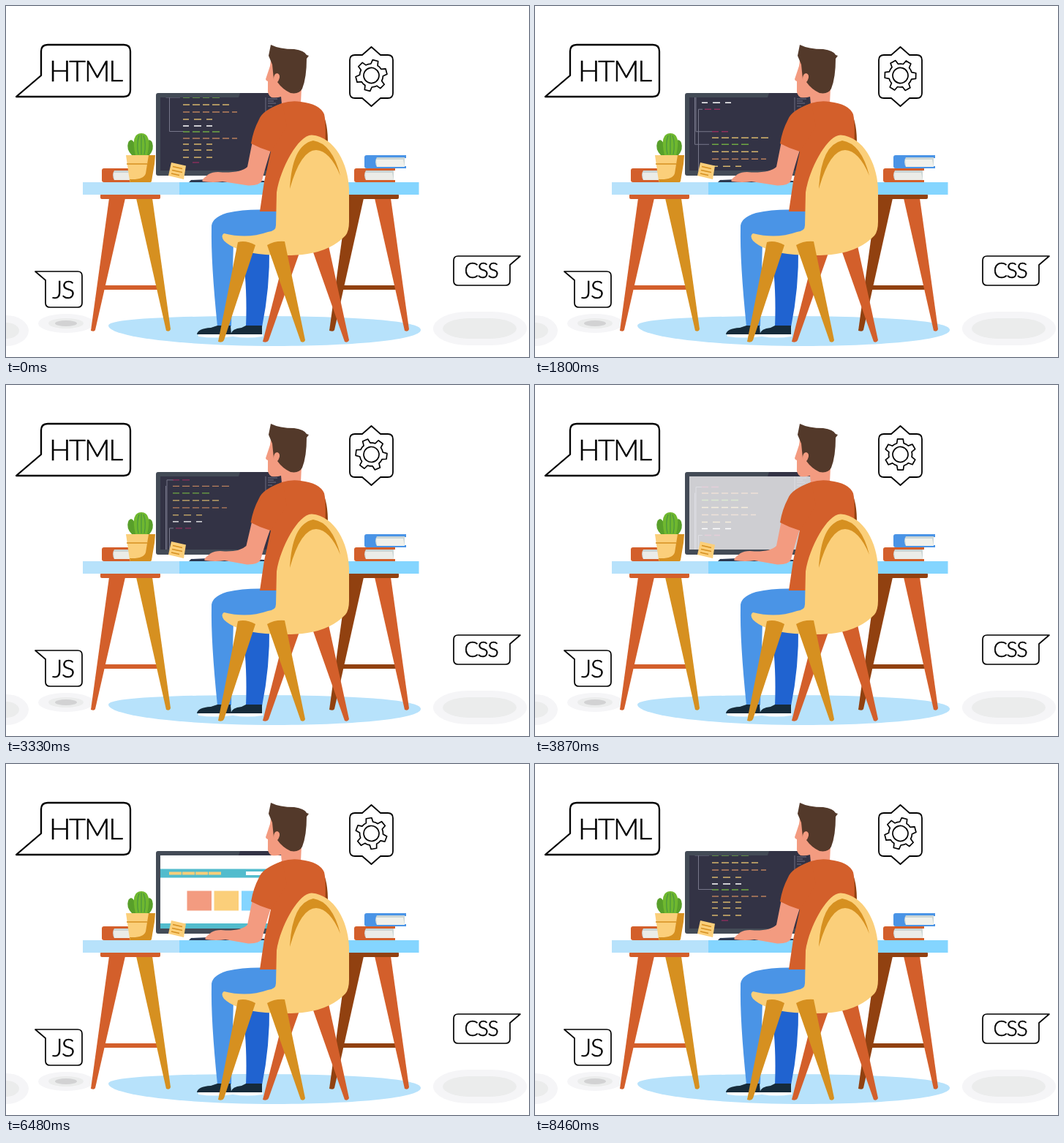
These frames come from a looping animation (715 by 480 pixels, 8.53 s). An HTML page:

```html
<!DOCTYPE html>
<html lang="en">
<head>
<meta charset="utf-8">
<title>Developer at work</title>
<style>
  html, body { margin: 0; width: 100%; height: 100%; overflow: hidden; background: #fff; }
  svg { display: block; width: 715px; height: 480px; }
  text { font-family: Lato, "Open Sans", sans-serif; font-weight: 300; text-anchor: middle; stroke: #000; stroke-width: .6; }
  .line { fill: none; stroke: #000; stroke-linejoin: round; }
  .or { fill: #d35f2b; } .gold { fill: #d69020; } .sand { fill: #fbcf7a; }
  .brown { fill: #914110; } .skin { fill: #f39b80; } .teal { fill: #52bccd; }
  .sky { fill: #84d5ff; } .pale { fill: #b7e2fb; } .navy { fill: #162b3a; }
</style>
</head>
<body>
<svg viewBox="0 0 715 480">
  <defs>
    <clipPath id="screen"><rect x="211" y="125" width="174" height="100"/></clipPath>
  </defs>

  <!-- floor -->
  <g fill="#f5f5f7">
    <ellipse cx="0" cy="444" rx="31" ry="21"/>
    <ellipse cx="82" cy="434" rx="38" ry="13"/>
    <rect x="584" y="418" width="128" height="46" rx="48" ry="23"/>
  </g>
  <g fill="#ebecec">
    <ellipse cx="0" cy="444" rx="18" ry="11"/>
    <ellipse cx="82" cy="434" rx="24" ry="7"/>
    <rect x="597" y="427" width="101" height="28" rx="38" ry="14"/>
  </g>
  <ellipse cx="82" cy="434" rx="15" ry="4" fill="#d2d2d3"/>
  <path class="pale" d="M140 437C140 428 225 424 340 424C470 424 567 430 567 443C567 456 480 465 370 465C240 465 140 452 140 437Z"/>

  <!-- speech bubbles -->
  <path class="line" stroke-width="2.3" d="M57 53H161Q170 53 170 62V115Q170 124 161 124H14L48 95V62Q48 53 57 53Z"/>
  <text x="108.5" y="102.5" font-size="39" letter-spacing="-2">HTML</text>
  <path class="line" stroke-width="1.7" d="M40 363H98Q104 363 104 369V406Q104 412 98 412H60Q54 412 54 406V375Z"/>
  <text x="78" y="400" font-size="34" letter-spacing="-1.5">JS</text>
  <path class="line" stroke-width="1.7" d="M618 342H703L689 354V376Q689 382 683 382H618Q612 382 612 376V348Q612 342 618 342Z"/>
  <text x="649.5" y="371.5" font-size="28.500" letter-spacing="-1.2">CSS</text>
  <path class="line" stroke-width="1.8" d="M477 67H487L499.500 56L512 67H522Q529 67 529 74V119Q529 126 522 126H512L499.500 137L487 126H477Q470 126 470 119V74Q470 67 477 67Z"/>
  <g id="gear" class="line" stroke-width="1.7">
    <path id="teeth"/>
    <circle r="10.5"/>
  </g>

  <!-- desk legs -->
  <rect class="brown" x="455" y="382" width="78" height="6"/>
  <path class="brown" d="M467 263H489L449 443Q448 446 442 444Z"/>
  <path class="or" d="M504 263H526L551 442Q550 446 545 444Z"/>
  <rect class="brown" x="440" y="257" width="97" height="7" rx="2"/>
  <rect class="or" x="132" y="382" width="78" height="6"/>
  <path class="or" d="M141 263H163L122 443Q121 446 116 444Z"/>
  <path class="gold" d="M178 263H200L225 442Q224 446 219 444Z"/>
  <rect class="or" x="129" y="257" width="82" height="7" rx="2"/>

  <!-- books -->
  <path class="or" d="M134 222H170V241H134Q131 241 131 238V225Q131 222 134 222Z"/>
  <path d="M148 225H170V238H148Q144 231 148 225Z" fill="#cbd5d5"/>
  <path d="M147 228H170V238H148Z" fill="#ebece8"/>
  <path class="or" d="M479 222H532V225H530V238H532V241H479Q476 241 476 238V225Q476 222 479 222Z"/>
  <path d="M492 225H530V238H492Q488 231 492 225Z" fill="#cbd5d5"/>
  <path d="M491 228H528L530 238H492Z" fill="#ebece8"/>
  <path d="M493 204H547V208H545V219H547V222H493Q490 222 490 219V207Q490 204 493 204Z" fill="#4a94e6"/>
  <path d="M507 207H545V220H507Q503 213 507 207Z" fill="#cbd5d5"/>
  <path d="M506 210H543L545 220H507Z" fill="#f0f1ec"/>

  <!-- monitor -->
  <rect x="205" y="119" width="180" height="113" rx="3" fill="#434b56"/>
  <path d="M320 119H385V125H318Z" fill="#333345"/>
  <g clip-path="url(#screen)">
    <rect x="211" y="125" width="174" height="100" fill="#333345"/>
    <g id="code" fill="none">
      <path d="M229 11H220V107.500H242M218.500 19V125H238M229 77H223.500V171.500H243" stroke="#77778a" stroke-width="1"/>
    </g>
    <path d="M355 124V146M358 127H371M358 130H366M358 133H369M358 137H364" stroke="#74748a" stroke-width=".9" fill="none"/>
    <rect id="blank" x="211" y="125" width="174" height="100" fill="#fff"/>
    <rect id="bar" class="sky" x="254" y="177" width="0" height="5"/>
    <g id="page">
      <g id="nav">
        <rect class="teal" x="211" y="143.500" width="174" height="12"/>
        <path d="M223 149.500H294" stroke="#fbcf7a" stroke-width="4" stroke-dasharray="17 1"/>
        <rect x="328" y="147" width="34" height="5" fill="#fff"/>
      </g>
      <g id="cards">
        <rect class="skin" x="247.500" y="173.500" width="33.500" height="27"/>
        <rect class="sand" x="284.500" y="173.500" width="33.500" height="27"/>
        <rect class="sky" x="322" y="173.500" width="33.500" height="27"/>
      </g>
      <g id="hero">
        <rect class="teal" x="211" y="218" width="174" height="80"/>
        <rect class="sand" x="228" y="227.500" width="48" height="40"/>
        <path class="sand" d="M217 244V250L212.500 247Z"/>
        <path d="M288 242H340M288 245.300H340M288 248.600H340M288 252H340" stroke="#fff" stroke-width="1.4"/>
      </g>
    </g>
  </g>

  <!-- desk top and what stands on it -->
  <rect class="sky" x="105" y="241" width="459.500" height="17"/>
  <rect class="pale" x="105" y="241" width="132" height="17"/>
  <path d="M250 241L253 238L300 236L353 239V241Z" fill="#2b3850"/>
  <g fill="#589f2a">
    <path d="M172 204Q164 196 167 187Q171 179 176 188L182 204Z"/>
    <path d="M196 204Q203 196 200 187Q196 179 191 188L186 204Z"/>
    <path d="M177 204Q170 174 185 174Q200 174 193 204Z" fill="#6fb82f"/>
  </g>
  <path d="M181 203Q178 188 182 177M189 203Q192 188 188 177M185 203V176" fill="none" stroke="#4a9440" stroke-width="1.200"/>
  <path class="sand" d="M164 204H203L199 239Q199 241 196 241H172Q169 241 169 239Z"/>
  <path class="gold" d="M195 204H204L203 216L199 239Q199 241 196 241H170L169 237Q188 238 191 229Z"/>
  <path d="M165 216H193" stroke="#d69020" stroke-width="1.500"/>
  <path class="sand" d="M226 214L246 218.500L243 237L222 232Z"/>
  <path d="M228 219.500L241 222.500M227 224.500L241 227.500M226 229L237 231.500" stroke="#d69020" stroke-width="1.500"/>

  <!-- cup -->
  <g id="cup">
    <path class="skin" d="M331 151Q337 148 343 155L350 172L352 186L334 180L338 168L331 160Z"/>
    <path d="M321 124Q319 123 320 126L311 152Q311 156 316 157L329 161Q332 161 333 157L343 132Q344 130 341 129Z" fill="#f7f7f7"/>
    <path d="M339 129L343 130L332 158L329 160Z" fill="#dcdde0"/>
    <path class="skin" d="M333 151Q338 149 341 155L343 166L337 166Z"/>
  </g>

  <!-- person -->
  <path d="M322 330H360Q361 385 350 439H328Q330 385 324 345Z" fill="#2063d0"/>
  <path d="M281 303Q280 290 302 283Q335 276 372 280V318L311 322L308 438H289Q280 350 281 303Z" fill="#4a94e6"/>
  <path d="M263 449H351V452Q330 455 310 452Q285 455 263 452Z" fill="#fff"/>
  <path class="navy" d="M261 449Q262 441 280 440L289 437H307L308 449Z"/>
  <path class="navy" d="M307 449Q309 441 322 440L328 437H350V449Z"/>
  <path class="brown" d="M433 148Q440 160 440 188L430 190Z"/>
  <path class="skin" d="M362 74L361 82L355 100Q355 102 358 103L358 112Q357 122 363 125Q370 126 376 124L377 134Q390 137 403 133L404 112L400 76Z"/>
  <path class="or" d="M377 133Q390 129 403 131Q429 134 435 148Q438 160 436 200L420 281H347L353 240L362 199L346 160Q351 143 377 133Z"/>
  <path d="M362 53Q374 59 394 59Q408 61 411 67L414 68L411 72Q411 98 405 113Q401 121 389 119Q378 114 371 104L366 100L364 80L359 68Z" fill="#53392a"/>
  <path class="skin" d="M366 100Q366 92 371 92Q376 94 373 101Q371 106 367 104Z"/>
  <g id="lean">
    <path id="arm" class="skin"/>
    <path class="or" d="M378 133Q351 142 346 155Q338 170 335 188Q348 195 362 199L384 165Z"/>
  </g>

  <!-- chair -->
  <path class="or" d="M382 338H401L359 457Q357 461 351 459Z"/>
  <path class="or" d="M419 334L441 328L469 457Q467 461 463 459Z"/>
  <path class="sand" d="M418 176.500C400 176 375 222 370 255L369 300Q369 308 358 309Q330 319 298 311Q293 314 298 321Q311 334 345 339Q385 343 412 339Q445 334 464 314Q469 308 469 295V250C468 217 450 179 418 176.500Z"/>
  <path class="gold" d="M388 250Q391 190 420 184Q446 188 457 232Q443 198 424 197Q403 197 388 250Z"/>
  <path class="gold" d="M317 323Q328 320 341 327L298 457Q296 461 290 459Z"/>
  <path class="gold" d="M357 327Q367 321 381 322L409 457Q408 461 403 459Z"/>
</svg>

<script>
const LOOP = 8530, STEP = 30, LAST = 8460;
const $ = id => document.getElementById(id);
const ramp = (t, a, b) => Math.min(1, Math.max(0, (t - a) / (b - a)));
const ease = (t, a, b) => { const p = ramp(t, a, b); return p * p * (3 - 2 * p); };
const set = (id, name, value) => $(id).setAttribute(name, value);
const move = (id, x, y) => set(id, "transform", `translate(${x} ${y})`);

// Code rows: y, left, right, colour
const YELLOW = "#d6b56c", RUST = "#b9805c", GREEN = "#6fa843", PLUM = "#8f2f5c", WHITE = "#fff";
const rows = [
  [11, 228, 251, PLUM], [19.5, 228, 305, RUST], [29, 228, 280, GREEN],
  [39, 228, 291, YELLOW], [49, 228, 302, RUST], [59, 228, 268, YELLOW],
  [68, 228, 268, WHITE], [77, 232, 253, PLUM], [107.5, 242, 264, PLUM],
  [116, 242, 319, YELLOW], [125, 242, 295, GREEN], [135, 242, 305, YELLOW],
  [145, 242, 316, RUST], [155, 242, 282, YELLOW], [164, 242, 282, WHITE],
  [172, 242, 294, GREEN], [181, 242, 316, RUST], [189, 242, 282, YELLOW],
  [197, 242, 282, YELLOW], [207, 242, 282, YELLOW], [214, 255, 265, PLUM]
];

function addRow([y, x1, x2, stroke]) {
  const line = document.createElementNS("http://www.w3.org/2000/svg", "line");
  const dash = x2 - x1 === 40 ? "8 7 10 7" : "9 4 10 4";
  const attrs = { x1, x2, y1: y, y2: y, stroke, "stroke-width": 1.4, "stroke-dasharray": dash };
  for (const name in attrs) line.setAttribute(name, attrs[name]);
  $("code").append(line);
}

function gearPath(teeth, root, tip) {
  const pitch = 2 * Math.PI / teeth, points = [];
  for (let i = 0; i < teeth; i++) {
    for (const [at, r] of [[-0.29, root], [-0.17, tip], [0.17, tip], [0.29, root], [0.5, root]]) {
      const a = (i + at) * pitch;
      points.push(`${(r * Math.cos(a)).toFixed(2)} ${(r * Math.sin(a)).toFixed(2)}`);
    }
  }
  return "M" + points.join("L") + "Z";
}

// Forearm with the elbow moved by e and the hand by h
const armPath = (e, h) => `M337 185L363 194Q${354 + e} 222 ${350 + e} 239
  Q${346 + e} 246 ${331 + e} 245.5L${300 + h} 240Q${288 + h} 242 ${273 + h} 240
  Q${270 + h} 238 ${281 + h} 230Q${288 + h} 226 ${300 + h} 227.5Q${322 + e} 228 ${330 + e} 220Z`;

function draw(t) {
  set("gear", "transform", `translate(499.5 95) rotate(${t / LAST * 360 - 15})`);

  const scroll = t < 7000 ? 0.0357 * Math.min(t, 3600) : 0;
  move("code", 0, scroll);
  set("blank", "opacity", ramp(t, 3600, 3955) * (1 - ramp(t, 8000, 8300)));

  set("bar", "width", t < 5240 ? 80 * ramp(t, 4380, 5200) : 0);

  move("page", 0, -33 * ease(t, 6480, 7540));
  set("page", "opacity", 1 - ramp(t, 8000, 8250));
  set("nav", "opacity", ramp(t, 5250, 5500));
  move("cards", 0, 52 * (1 - ease(t, 5500, 6050)));
  set("cards", "opacity", ramp(t, 5480, 5520));
  move("hero", 0, 8 * (1 - ease(t, 5900, 6300)));

  const sip = ease(t, 1860, 2580) * (1 - ease(t, 2820, 3480));
  const away = 1 - sip;
  set("cup", "transform", `translate(${50 * away} ${45 * away}) rotate(${-15 * away} 327 142)`);
  set("cup", "visibility", sip ? "visible" : "hidden");

  // The upper arm leans outwards, pivoting at the shoulder
  const lean = -0.085 * sip;
  set("lean", "transform", `matrix(1 0 ${lean} 1 ${-lean * 150} 0)`);
  const tap = t < 3900 ? -2 - 2 * Math.cos(2 * Math.PI * t / 600) : 0;
  set("arm", "d", armPath(-6 * sip, tap));
}

rows.forEach(addRow);
set("teeth", "d", gearPath(6, 16, 21.5));

const start = performance.now();
function tick() {
  const t = (performance.now() - start) % LOOP;
  draw(Math.min(Math.floor(t / STEP) * STEP, LAST));
  requestAnimationFrame(tick);
}
tick();
</script>
</body>
</html>
```
